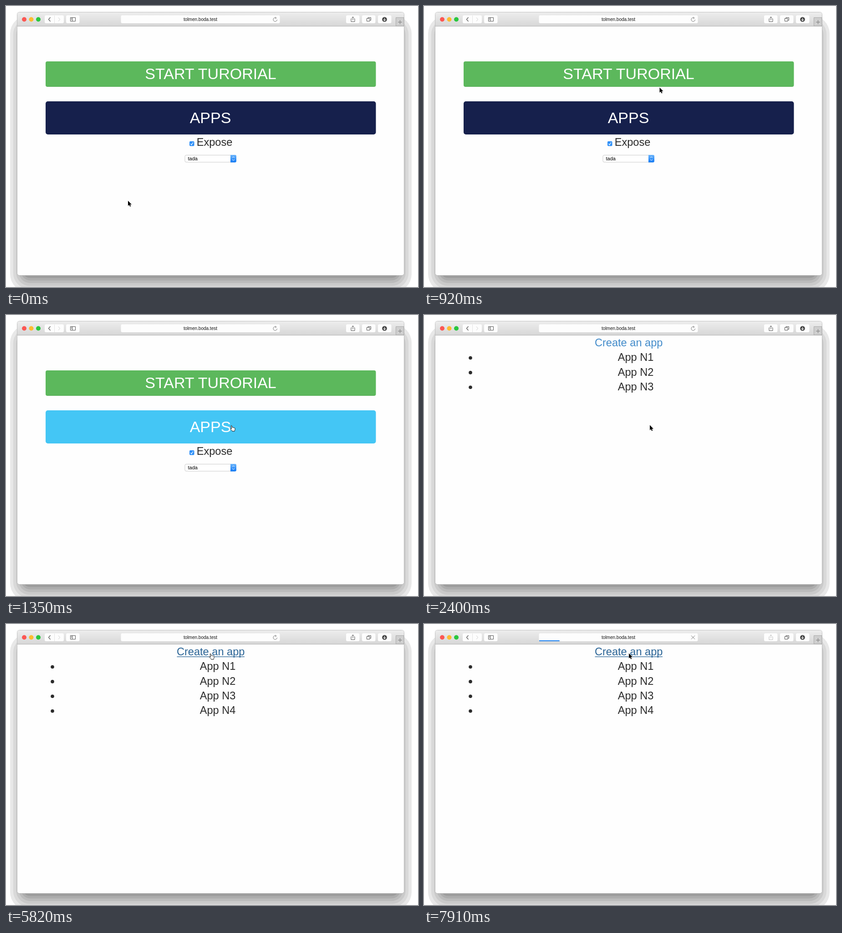
These frames come from a looping animation (905x619 px, 8 s). An HTML page:

```html
<!DOCTYPE html>
<html lang="en">
<head>
<meta charset="utf-8">
<title>Browser demo</title>
<style>
  html, body { margin: 0; width: 100%; height: 100%; overflow: hidden; background: #fff; }
  svg { display: block; width: 905px; height: 619px; }
  text { font-family: "Liberation Sans", Arial, sans-serif; }
  .mid { text-anchor: middle; }
  .body { font-size: 23.6px; fill: #2b2b2b; }
  .big { font-size: 34px; fill: #fff; }
  .line { fill: none; stroke: #555; }
  .pale { stroke: #777; }
</style>
</head>
<body>
<svg viewBox="0 0 905 619">
  <defs>
    <linearGradient id="bar" x2="0" y2="1">
      <stop offset="0" stop-color="#ededed"/><stop offset="1" stop-color="#d7d7d7"/>
    </linearGradient>
    <linearGradient id="blue" x2="0" y2="1">
      <stop offset="0" stop-color="#6cb5fb"/><stop offset="1" stop-color="#1279f5"/>
    </linearGradient>
  </defs>
  <g id="shadow"></g>

  <!-- window -->
  <rect x="24.5" y="13.5" width="850" height="580" rx="5" fill="#fefefe" stroke="#aaa" stroke-opacity=".7"/>
  <path d="M25 44V19Q25 14 30 14H869Q874 14 874 19V44Z" fill="url(#bar)"/>
  <path d="M25 44.5H874" stroke="#b1b1b1"/>
  <circle cx="40" cy="29.5" r="5" fill="#fc5753"/>
  <circle cx="55.5" cy="29.5" r="5" fill="#fdbc31"/>
  <circle cx="71" cy="29.5" r="5" fill="#2ac73f"/>
  <g id="buttons" fill="#fdfdfd">
    <rect x="85" y="20.5" width="42" height="17.5" rx="3"/>
    <rect x="132" y="20.5" width="29.5" height="17.5" rx="3"/>
    <rect x="252.5" y="20.5" width="349" height="17.5" rx="3"/>
  </g>
  <path d="M106.5 21V38" stroke="#e2e2e2"/>
  <path d="M97.5 25L93.5 29.5 97.5 34" class="line" stroke-width="1.2"/>
  <path d="M115 25.5L118.5 29.5 115 33.5" fill="none" stroke="#ccc"/>
  <path d="M141.5 25.5H152.5V33.5H141.5ZM145.5 25.5V33.5M143 27.5H144.5M143 29.5H144.5" class="line"/>
  <path id="share" d="M759.5 28H758V34.5H766V28H764.5M762 31.5V23.8M759.8 26L762 23.8 764.2 26" class="line"/>
  <path d="M792.5 27.5H799V33.5H792.5ZM795 27V25.5H801.5V31.5H799.5" class="line"/>
  <circle cx="831.5" cy="29.5" r="5.3" fill="#444"/>
  <path d="M831.5 26.5V32M829 29.8L831.5 32.3 834 29.8" fill="none" stroke="#fff" stroke-width="1.2"/>
  <path d="M856.5 44V25.5H874V44Z" fill="#cfcfcf" stroke="#a9a9a9"/>
  <path d="M861 35.5H870M865.5 31V40" class="line pale"/>
  <text x="427" y="33" font-size="10" class="mid" fill="#111">tolmen.boda.test</text>
  <path id="reload" d="M593.5 26.4A4.2 4.2 0 1 0 595.4 30M591.5 24L593.8 26.5 591.3 28.4" class="line pale"/>
  <g id="loading">
    <path d="M587 25.5L595 33.5M595 25.5L587 33.5" class="line pale"/>
    <rect id="progress" x="253" y="36" height="2" fill="#1a80f0"/>
  </g>

  <!-- start page -->
  <g id="home">
    <rect id="start" x="87" y="122" width="725.5" height="56" rx="4"/>
    <path d="M90 177.5H809" stroke="#000" stroke-opacity=".08"/>
    <text x="449.5" y="161" class="big mid">START TURORIAL</text>
    <rect id="apps" x="87" y="210" width="725.5" height="73" rx="5"/>
    <text x="449" y="258" class="big mid">APPS</text>
    <rect x="403" y="298" width="10.5" height="10.5" rx="2" fill="#2f90f8"/>
    <path d="M405.5 303.5L407.5 306 411 300.5" fill="none" stroke="#fff" stroke-width="1.3"/>
    <text x="458" y="307.5" class="body mid">Expose</text>
    <rect x="393" y="328.5" width="112.5" height="15.5" rx="3" fill="#fff" stroke="#cbcbcb"/>
    <path d="M493 328H503Q506 328 506 331V341Q506 344.5 503 344.5H493Z" fill="url(#blue)"/>
    <path d="M497 334.5L499.5 332 502 334.5M497 338L499.5 340.5 502 338" fill="none" stroke="#fff"/>
    <text x="399.5" y="340" font-size="11">tada</text>
  </g>

  <!-- list page -->
  <g id="list">
    <text id="link" x="449.7" y="68.7" class="body mid">Create an app</text>
    <rect id="under" x="375.5" y="71.5" width="148.5" height="1.3" fill="#2a6496"/>
    <g id="rows"></g>
  </g>

  <path id="arrow" d="M0 0V11.3L2.6 8.9 4.3 12.9 6.2 12.1 4.5 8.2H8Z" stroke="#fff" stroke-width=".9" paint-order="stroke"/>
  <path id="hand" d="M2.2 1.6C2 .2 3.9 0 4.2 1.3L5.2 5C6 4.3 7 4.5 7.3 5.2 8 4.6 9 4.9 9.2 5.6 10.2 5.3 11 6 11 7V9.5C11 10.5 10.2 11 10 13H5C4.6 11.4 1.6 9.6.9 8.2.3 7 1.6 6.5 2.6 7.3L3.4 8Z" fill="#fff" stroke="#111" stroke-linejoin="round"/>
</svg>

<script>
const LOOP = 8000, TICK = 149.2;
// ticks at which the page changes
const OPEN = 16, LEAVE = 17, ARRIVE = 27, ADDED = 39, LOAD = 50;
const $ = id => document.getElementById(id);

function add(parent, tag, attrs, text = '') {
  const el = document.createElementNS('http://www.w3.org/2000/svg', tag);
  for (const k in attrs) el.setAttribute(k, attrs[k]);
  el.textContent = text;
  return parent.appendChild(el);
}

for (let i = 0; i < 6; i++) {
  const x = 9 + 7 * i - 0.24 * i * i, y = x + 12, g = 232 - 15 * i;
  add($('shadow'), 'rect', {
    x, y, width: 900 - 2 * x, height: 640 - 1.07 * x - y, rx: 40 - 5 * i, fill: `rgb(${g},${g},${g})`
  });
}

for (let i = 0; i < 3; i++)
  add($('buttons'), 'rect', { x: 747 + 35 * i, y: 20.5, width: 29.5, height: 17.5, rx: 3 });

const rows = [1, 2, 3, 4].map(n => {
  const y = 68.7 + n * 32.4, row = add($('rows'), 'g', {});
  add(row, 'circle', { cx: 102, cy: y - 6.6, r: 3.8, fill: '#2b2b2b' });
  add(row, 'text', { x: 465, y, class: 'body mid' }, 'App N' + n);
  return row;
});

const toApps = [[268, 429], [402, 492], [517.5, 179.5], [496, 242.5]];
const toLink = [[496, 242.5], [684, 322], [364, 110], [450, 64.5]];

// smooth curve through evenly timed points, u from 0 to 1
function glide(points, u) {
  const last = points.length - 1;
  const s = Math.min(Math.max(u, 0), 1) * last;
  const i = Math.min(Math.floor(s), last - 1), f = s - i;
  const p = n => points[Math.min(Math.max(n, 0), last)];
  return [0, 1].map(c => {
    const a = p(i)[c], b = p(i + 1)[c];
    const va = (b - p(i - 1)[c]) / 2, vb = (p(i + 2)[c] - a) / 2;
    return a + f * (va + f * (3 * (b - a) - 2 * va - vb + f * (2 * (a - b) + va + vb)));
  });
}

const show = (el, on) => el.style.display = on ? '' : 'none';
const place = (el, x, y) => el.setAttribute('transform', `translate(${x} ${y})`);

function draw(k) {
  const home = k < OPEN, loading = k >= LOAD;
  const [x, y] = home ? glide(toApps, k / 9) : glide(toLink, (k - LEAVE) / (ARRIVE - LEAVE));
  const over = (left, top, right, bottom) => x > left && x < right && y > top && y < bottom;
  const onStart = home && over(87, 122, 812, 178);
  const onApps = home && over(87, 210, 812, 283);
  const onLink = !home && over(375, 46, 524, 74);
  const hand = (onStart || onApps || onLink) && !loading;

  place($('arrow'), x, y);
  place($('hand'), x - 4, y + 0.5);
  show($('arrow'), !hand);
  show($('hand'), hand);

  show($('home'), home);
  show($('list'), !home);
  $('start').style.fill = onStart ? '#449d44' : '#5cb85c';
  $('apps').style.fill = onApps ? '#44c6f5' : '#16204c';
  $('link').style.fill = onLink ? '#2a6496' : '#428bca';
  show($('under'), onLink);
  show(rows[3], k >= ADDED);

  show($('reload'), !loading);
  show($('loading'), loading);
  $('progress').setAttribute('width', loading ? 46 * (1 - Math.exp(-0.9 * (k - LOAD + 1))) : 0);
  $('share').style.opacity = loading ? 0.35 : 1;
}

const t0 = performance.now();
function tick() {
  const t = (performance.now() - t0) % LOOP;
  draw(Math.floor((t + 10) / TICK));
  requestAnimationFrame(tick);
}
tick();
</script>
</body>
</html>
```
